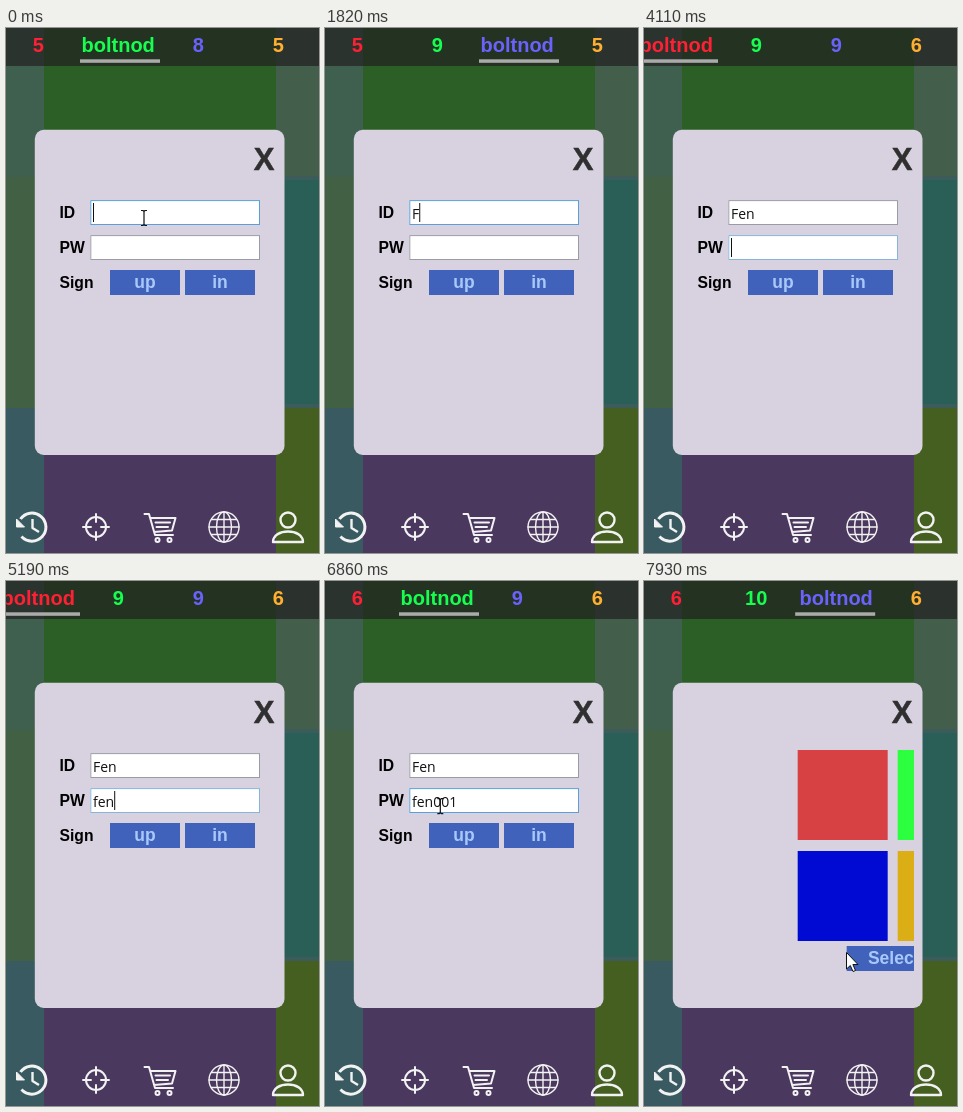
Recreate the animation shown at these times as an HTML page. Size 313 px wide and 525 px high, loop 8000 ms.

```html
<!DOCTYPE html>
<html lang="en">
<head>
<meta charset="utf-8">
<title>Sign in</title>
<style>
  html, body { margin: 0; width: 100%; height: 100%; overflow: hidden; background: #2c5f25; }
  svg { display: block; width: 313px; height: 525px; }
  text { font: bold 15.7px "Liberation Sans", Arial, sans-serif; }
  .score { font-size: 20px; text-anchor: middle; }
  .button rect { fill: #4062ba; }
  .button text { font-size: 17.5px; fill: #a9c8fa; text-anchor: middle; }
  .typed { font: 14px "Open Sans", "Noto Sans", sans-serif; fill: #111; }
  .field { fill: #fff; }
  .edge { fill: none; }
  .icons { fill: none; stroke: #f2f2f2; stroke-linecap: round; stroke-linejoin: round; }
</style>
</head>
<body>
<svg viewBox="0 0 313 525">
  <defs><clipPath id="window"><rect x="38" y="150" width="232" height="270"/></clipPath></defs>

  <g id="tiles"></g>
  <path d="M270 150H313M270 378H313" stroke="#3c5c5c" stroke-width="4"/>
  <rect width="313" height="38" fill="#222" opacity=".72"/>
  <g id="scores"></g>
  <rect id="underline" y="31.3" width="80" height="3.5" fill="#ababab"/>

  <rect x="28.8" y="101.800" width="249.700" height="325.200" rx="9" fill="#d8d2e0"/>
  <text x="258" y="142" text-anchor="middle" style="font-size:31px" fill="#303030" stroke="#303030" stroke-width=".5">X</text>

  <g clip-path="url(#window)">
    <g id="login">
      <text x="53.5" y="190">ID</text>
      <text x="53.5" y="225">PW</text>
      <text x="53.5" y="260">Sign</text>
      <g id="fields"></g>
      <rect id="caret" width="1" height="19" fill="#111"/>
      <g class="button"><rect x="104" y="242" width="70" height="25"/><text x="139" y="260">up</text></g>
      <g class="button"><rect x="179" y="242" width="70" height="25"/><text x="214" y="260">in</text></g>
    </g>
    <g id="picker">
      <rect x="59" y="169" width="90" height="90" fill="#d74144"/>
      <rect x="159" y="169" width="90" height="90" fill="#2bff40"/>
      <rect x="59" y="270" width="90" height="90" fill="#000ad2"/>
      <rect x="159" y="270" width="90" height="90" fill="#dcae16"/>
      <g class="button"><rect x="108" y="365" width="92" height="25"/><text x="155" y="383">Select</text></g>
    </g>
  </g>

  <g class="icons">
    <g stroke-width="3" stroke-linecap="butt">
      <path d="M14.5 491A14 14 0 1 1 15.5 508.500"/>
      <path d="M26.500 491V500L33 504" stroke-width="2.400"/>
      <path d="M10.500 491V499H18.500Z" fill="#f2f2f2" stroke-width="1"/>
    </g>
    <g stroke-width="2">
      <circle cx="90" cy="499" r="10"/>
      <path d="M90 486V494M90 504V512M77 499H85M95 499H103"/>
    </g>
    <g stroke-width="2">
      <path d="M138.500 486H143L149 507H167M144 490H169.500L166 502.500L148 504M149.500 494.500H164M150.500 499H162"/>
      <circle cx="151.500" cy="512" r="2"/><circle cx="163.500" cy="512" r="2"/>
    </g>
    <g stroke-width="1.400">
      <circle cx="218" cy="499" r="15"/><ellipse cx="218" cy="499" rx="7.500" ry="15"/>
      <path d="M218 484V514M203 499H233M205.500 491.500H230.500M205.500 506.500H230.500"/>
    </g>
    <g stroke-width="2.400">
      <circle cx="282" cy="492" r="7.500"/>
      <path d="M267 514C267 500 297 500 297 514Z"/>
    </g>
  </g>

  <path id="beam" d="M-3 -7.500H-1L0 -6.500L1 -7.500H3M0 -6.500V6.500M-3 7.500H-1L0 6.500L1 7.500H3" fill="none" stroke="#111" stroke-width="1.200"/>
  <path id="arrow" d="M0 0V16.500L3.800 13L6.500 19L9 18L6.400 12H11.500Z" fill="#fff" stroke="#111"/>
</svg>

<script>
const LOOP = 8000;
const PLAYER = "boltnod";
const $ = id => document.getElementById(id);

function add(parent, tag, attributes) {
  const node = document.createElementNS("http://www.w3.org/2000/svg", tag);
  for (const key in attributes) node.setAttribute(key, attributes[key]);
  return parent.appendChild(node);
}

// Background columns: x, width, colours from top to bottom
const columns = [
  [0, 38, ["#40604f", "#426044", "#385a60"]],
  [38, 232, ["#2c5f25", "#2c5f25", "#4a385f"]],
  [270, 43, ["#435e4a", "#2a5f58", "#445f1f"]],
];
for (const [x, width, fills] of columns)
  fills.forEach((fill, row) => {
    const y = [0, 149, 380][row];
    add($("tiles"), "rect", { x, y, width, height: 525 - y, fill });
  });

const scores = ["#ff2034", "#16ff50", "#6a62fa", "#ffb02e"].map((fill, i) =>
  add($("scores"), "text", { class: "score", x: 32.2 + 80 * i, y: 24.3, fill }));

const fields = [172, 207].map(y => ({
  y,
  box: add($("fields"), "rect", { class: "field", x: 84, y, width: 170, height: 25 }),
  edge: add($("fields"), "rect", { class: "edge", x: 84.8, y: y + 0.6, width: 168.7, height: 23.9 }),
  text: add($("fields"), "text", { class: "typed", x: 87, y: y + 18.5 }),
}));

const moves = [60, 2040, 3570, 5560, 7456];
const MOVE_TIME = 540;
const SLIDE_START = 7560, SLIDE_TIME = 238, SLIDE_WIDTH = 232;

// Key presses: time, field, text
const keys = [
  [-100, 0, ""], [1670, 0, "F"], [2130, 0, "Fe"], [2430, 0, "Fen"],
  [2810, 1, ""], [4410, 1, "f"], [4560, 1, "fe"], [5180, 1, "fen"],
  [5640, 1, "fen0"], [5790, 1, "fen00"], [6050, 1, "fen001"],
];

// Pointer stops: time, x, y
const pointer = [
  [0, 138, 190], [150, 138, 190], [600, 136, 202], [900, 136, 220],
  [1210, 138, 192], [6550, 132, 222], [6860, 115, 225], [7160, 208, 252],
  [7320, 208, 252], [7620, 203, 316], [7930, 202, 371], [8000, 202, 373],
];

const swing = p => 0.5 - Math.cos(Math.PI * Math.min(1, Math.max(0, p))) / 2;
const mix = (a, b, p) => a + (b - a) * p;
const show = (node, on) => node.setAttribute("visibility", on ? "visible" : "hidden");
const place = (node, x, y = 0) => node.setAttribute("transform", `translate(${x} ${y})`);

function drawScores(t) {
  const counts = [5, 8, 8, 5];
  let active = 1, x = 74;
  for (const start of moves) {
    if (t < start) break;
    counts[active]++;
    active = (active + 1) % 4;
    x = mix(x, 80 * active - 6, swing((t - start) / MOVE_TIME));
  }
  scores.forEach((node, i) => node.textContent = i === active ? PLAYER : counts[i]);
  $("underline").setAttribute("x", x);
}

function drawFields(t) {
  const typed = ["", ""];
  let focus = 0, pressed = 0;
  for (const [time, field, text] of keys) {
    if (t < time) break;
    typed[field] = text;
    focus = field;
    pressed = time;
  }
  const sliding = t >= SLIDE_START;
  const hover = [t < 900 || (t >= 1210 && t < 2130), (t >= 900 && t < 1210) || (t >= 6550 && t < 7000)];
  fields.forEach(({ edge, text }, i) => {
    text.textContent = sliding ? "" : typed[i];
    edge.setAttribute("stroke", hover[i] ? "#5a9fd8" : i === focus ? "#86b4da" : "#9b9ba5");
    show(edge, !sliding);
  });
  const caret = $("caret");
  caret.setAttribute("x", 87 + fields[focus].text.getComputedTextLength());
  caret.setAttribute("y", fields[focus].y + 3);
  show(caret, !sliding && (t - pressed) % 1060 < 530);
}

function drawPages(t) {
  const p = (t - SLIDE_START) / SLIDE_TIME;
  place($("login"), -SLIDE_WIDTH * swing(p));
  place($("picker"), SLIDE_WIDTH * (1 - swing(p - 1)));
}

function drawPointer(t) {
  const next = Math.max(1, pointer.findIndex(stop => stop[0] > t));
  const [t0, x0, y0] = pointer[next - 1], [t1, x1, y1] = pointer[next];
  const p = (t - t0) / (t1 - t0);
  const x = mix(x0, x1, p), y = mix(y0, y1, p);
  const visible = t < 1670 || t >= 6550;
  const overField = y < 233 && t < 7160;
  place($("beam"), x, y);
  place($("arrow"), x + 0.5, y + 0.5);
  show($("beam"), visible && overField);
  show($("arrow"), visible && !overField);
}

function frame() {
  const t = performance.now() % LOOP;
  drawScores(t);
  drawFields(t);
  drawPages(t);
  drawPointer(t);
  requestAnimationFrame(frame);
}
frame();
</script>
</body>
</html>
```
